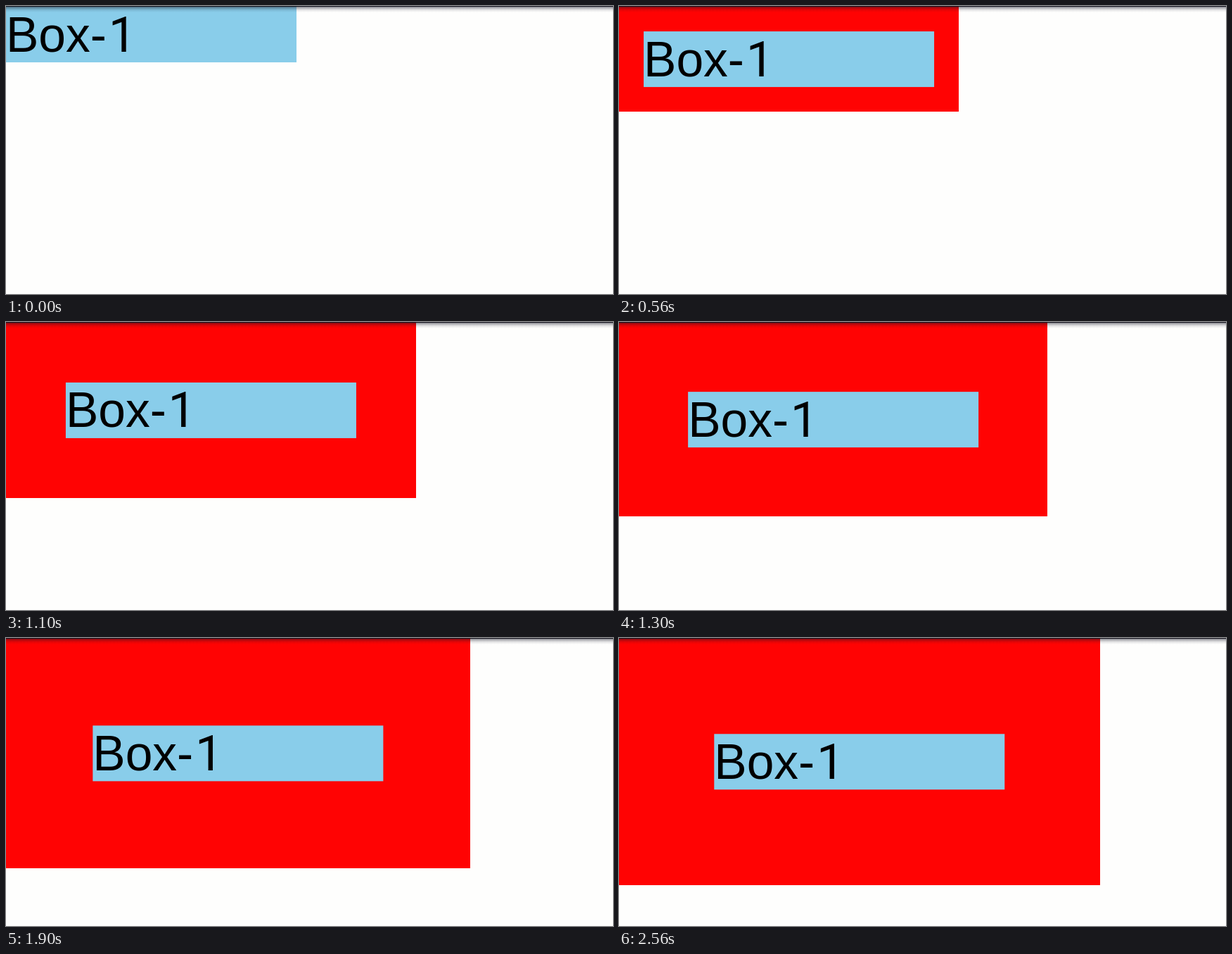
An HTML page with a canvas for the animation above (2.6 s loop, 863 by 409 pixels).

```html
<!DOCTYPE html>
<html lang="en">
<head>
<meta charset="utf-8">
<title>Growing border</title>
<style>
  html, body { margin: 0; width: 100%; height: 100%; overflow: hidden; background: #fefefd; }
  canvas { display: block; }
</style>
</head>
<body>
<canvas id="stage" width="863" height="409"></canvas>
<script>
const LOOP = 2600, DURATION = 3080, MAX_BORDER = 137.6;
const BOX = { top: 1, width: 413, height: 79 };
const ctx = document.getElementById('stage').getContext('2d');

const shade = ctx.createLinearGradient(0, 1, 0, 9);
[[0, .55], [.25, .3], [.6, .1], [1, 0]].forEach(([stop, alpha]) =>
  shade.addColorStop(stop, `rgba(20, 20, 35, ${alpha})`));

const bezier = (u, a, b) => 3 * u * (1 - u) ** 2 * a + 3 * u * u * (1 - u) * b + u ** 3;

// CSS "ease": cubic-bezier(.25, .1, .25, 1)
function ease(x) {
  let low = 0, high = 1;
  for (let i = 0; i < 24; i++) {
    const mid = (low + high) / 2;
    if (bezier(mid, .25, .25) < x) low = mid; else high = mid;
  }
  return bezier(low, .1, 1);
}

function rect(fill, x, y, width, height) {
  ctx.fillStyle = fill;
  ctx.fillRect(x, y, width, height);
}

function label(text, font, x, y, align) {
  ctx.font = font;
  ctx.textAlign = align;
  ctx.fillText(text, x, y);
}

function draw(now) {
  const border = MAX_BORDER * ease((now % LOOP) / DURATION);
  const { top, width, height } = BOX;
  rect('#fefefd', 0, 0, 863, 409);
  rect('#ff0303', 0, top, Math.round(width + 2 * border), Math.round(height + 2 * border));
  rect('#89cdea', border, top + border, width, height);

  ctx.fillStyle = '#000';
  const baseline = top + border + 63.5;
  label('Box-', '69.5px "Liberation Sans", Arial, sans-serif', border, baseline, 'left');
  // Roboto's "1" has no foot
  label('1', '70px Roboto, sans-serif', border + 185, baseline, 'right');

  rect(shade, 0, 1, 863, 8);
  rect('#15151f', 0, 0, 863, 1);
  requestAnimationFrame(draw);
}
requestAnimationFrame(draw);
</script>
</body>
</html>
```
